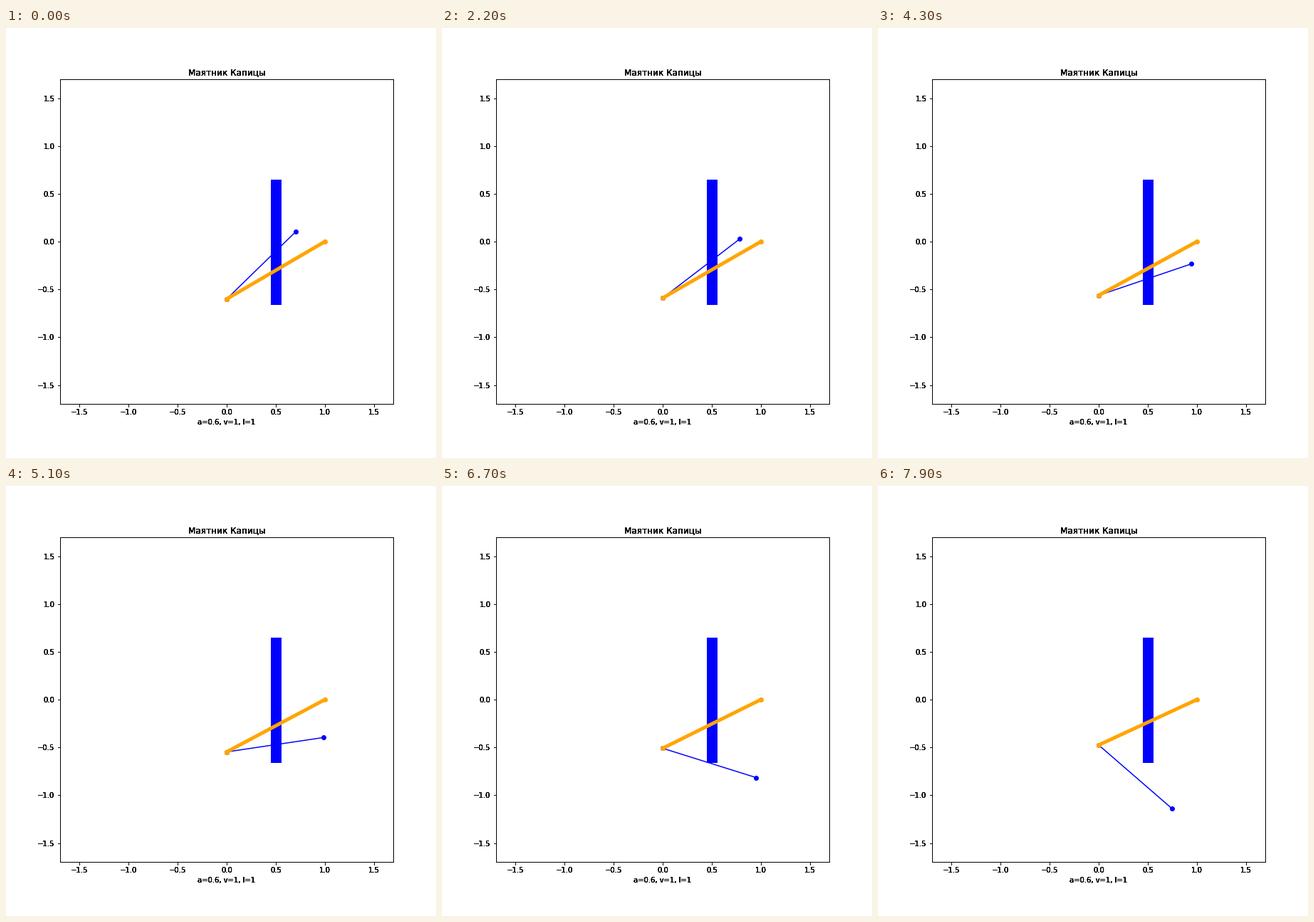
Write a matplotlib script that moves like this. It is 604 by 604 pixels and loops after 8000 ms.

```python
import numpy as np
import matplotlib.pyplot as plt
from matplotlib.animation import FuncAnimation

SIZE, DPI = 604, 72
FRAMES, INTERVAL = 80, 100
DT = 1 / 120                    # model time per frame
A, V, L = 0.6, 1, 1             # drive amplitude, frequency, rod length
G, DAMPING = 9.8, 1.0
LIMIT = 1.7
BOX = np.array([75.6, 75.6, 468.72, 456.624]) / SIZE
LAYERS = 5                      # repeated frame layers give the heavy, crisp lettering


def pivot(t):
    return -A * np.cos(V * t)


def slope(t, state):
    phi, omega = state
    force = (G + A * V**2 * np.cos(V * t)) * np.sin(phi) / L
    return np.array([omega, force - DAMPING * omega])


def solve(phi0, count, dt):
    """Angles from the upward vertical, integrated with RK4."""
    state, angles = np.array([phi0, 0.0]), []
    for i in range(count):
        angles.append(state[0])
        t = i * dt
        k1 = slope(t, state)
        k2 = slope(t + dt / 2, state + k1 * dt / 2)
        k3 = slope(t + dt / 2, state + k2 * dt / 2)
        k4 = slope(t + dt, state + k3 * dt)
        state = state + dt * (k1 + 2 * k2 + 2 * k3 + k4) / 6
    return angles


def add_layer(face):
    layer = fig.add_axes(BOX, facecolor=face, label=f"layer{len(fig.axes)}")
    layer.set(xlim=(-LIMIT, LIMIT), ylim=(-LIMIT, LIMIT))
    layer.set_title("Маятник Капицы")
    layer.set_xlabel(f"a={A}, v={V}, l={L}")
    return layer


plt.rcParams["font.family"] = "DejaVu Sans"
fig = plt.figure(figsize=(SIZE / DPI, SIZE / DPI), dpi=DPI, facecolor="white")
ax = add_layer("white")
for _ in range(LAYERS - 1):
    add_layer("none")

ax.plot([0.5, 0.5], [-A, A], color="blue", lw=15)
rod, = ax.plot([], [], "o-", color="blue", lw=1.5, ms=6)
crank, = ax.plot([], [], "o-", color="orange", lw=5, ms=6)

angles = solve(np.pi / 4, FRAMES, DT)


def update(i):
    y, phi = pivot(i * DT), angles[i]
    rod.set_data([0, L * np.sin(phi)], [y, y + L * np.cos(phi)])
    crank.set_data([0, 1], [y, 0])
    return rod, crank


anim = FuncAnimation(fig, update, frames=FRAMES, interval=INTERVAL,
                     repeat=True, repeat_delay=0, blit=False)
plt.show()
```
